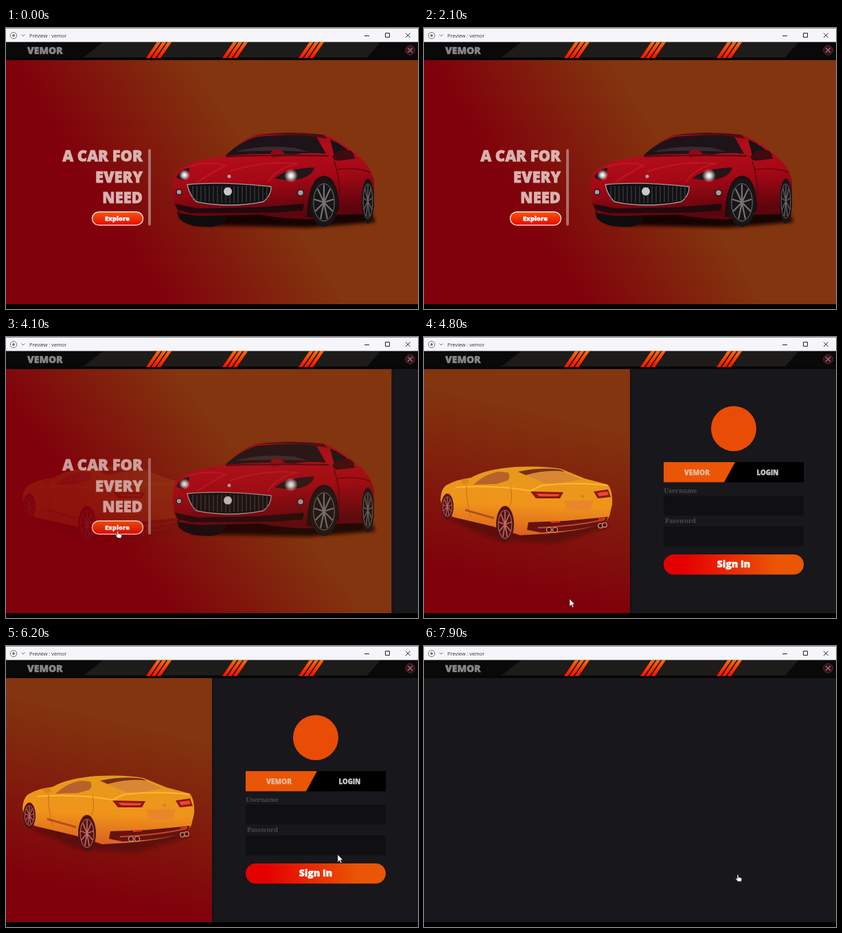
These frames come from a looping animation (600 px wide and 411 px high, 8000 ms). An HTML page:

```html
<!DOCTYPE html>
<html lang="en">
<head>
<meta charset="utf-8">
<title>Preview</title>
<style>
html, body { margin: 0; width: 100%; height: 100%; overflow: hidden; background: #18171c; }
svg { display: block; width: 600px; height: 411px; }
text { font-family: "Open Sans", "Noto Sans", sans-serif; }
.heavy { font-weight: 800; paint-order: stroke; stroke-width: .035em; }
.label { font: 700 9.3px "Noto Serif", serif; fill: #4b494d; }
.mid { text-anchor: middle; }
.end { text-anchor: end; }
</style>
</head>
<body>
<svg viewBox="0 0 600 411">
  <defs>
    <linearGradient id="back" gradientUnits="userSpaceOnUse">
      <stop offset="0" stop-color="#80000b"/><stop offset="1" stop-color="#82350e"/>
    </linearGradient>
    <linearGradient id="hot" x2="0" y2="1">
      <stop offset="0" stop-color="#ff6d06"/><stop offset="1" stop-color="#ff0c00"/>
    </linearGradient>
    <linearGradient id="pill" x2="0" y2="1">
      <stop offset="0" stop-color="#f9560a"/><stop offset="1" stop-color="#e60a02"/>
    </linearGradient>
    <linearGradient id="sign">
      <stop offset=".15" stop-color="#e50000"/><stop offset=".8" stop-color="#ea5506"/>
    </linearGradient>
    <linearGradient id="redPaint" x2=".2" y2="1">
      <stop offset="0" stop-color="#8d0a15"/><stop offset=".3" stop-color="#b30d1b"/><stop offset=".6" stop-color="#a60815"/><stop offset="1" stop-color="#5c050d"/>
    </linearGradient>
    <linearGradient id="goldPaint" x2="-.1" y2="1">
      <stop offset="0" stop-color="#e69a1c"/><stop offset=".5" stop-color="#f0941a"/><stop offset="1" stop-color="#d75a20"/>
    </linearGradient>
    <radialGradient id="glow">
      <stop offset="0" stop-color="#fff"/><stop offset=".3" stop-color="#fff" stop-opacity=".85"/><stop offset="1" stop-color="#fff" stop-opacity="0"/>
    </radialGradient>
    <filter id="soft" x="-20%" y="-100%" width="140%" height="300%"><feGaussianBlur stdDeviation="2.500"/></filter>
    <clipPath id="window"><rect y="46" width="600" height="358"/></clipPath>
  </defs>

  <rect width="600" height="411" fill="#18171c"/>

  <g id="login">
    <circle cx="451" cy="134" r="33" fill="#e94c05"/>
    <rect x="349" y="183" width="204" height="29.500"/>
    <path d="M349 183H453L437 212.500H349Z" fill="#ea5506"/>
    <text class="heavy mid" x="397.500" y="201.500" font-size="10" fill="#e9b69b" stroke="#e9b69b">VEMOR</text>
    <text class="heavy mid" x="500.500" y="201.500" font-size="9.700" fill="#c8c8c8" stroke="#c8c8c8">LOGIN</text>
    <text class="label" x="349.500" y="228">Username</text>
    <text class="label" x="351" y="272">Password</text>
    <path d="M349 232h204v29h-204zM349 277h204v29h-204z" fill="#100f12"/>
    <rect x="349" y="318" width="204" height="29.500" rx="14.750" fill="url(#sign)"/>
    <text class="heavy mid" x="451" y="337" font-size="14" fill="#fff" stroke="#fff">Sign In</text>
  </g>

  <g clip-path="url(#window)">
    <rect id="edge" y="46" height="358" fill="#000" opacity=".5" filter="url(#soft)"/>
    <rect id="panel" y="46" height="358" fill="url(#back)"/>

    <g id="goldCar">
      <path d="M35 266L105 297 190 302 270 278 250 270 130 262Z" fill="#42090a" opacity=".55" filter="url(#soft)"/>
      <path d="M24 238Q25 222 32 217 48 208 68 206 90 193 133 190 175 188 200 193L234 207 268 216Q275 225 274 245L270 262 264 272Q230 284 174 288L140 290 100 277 45 264 28 258Z" fill="url(#goldPaint)"/>
      <path d="M72 216Q88 201 108 197L122 198Q127 203 122 210L105 215Z" fill="#b7622c"/>
      <path d="M138 197Q170 191 198 195L228 208Q200 215 175 214Z" fill="#d98732"/>
      <path d="M137 197Q170 190 199 194L205 197Q180 193 148 202Z" fill="#763117"/>
      <path d="M46 220Q105 216 155 225L172 217Q220 212 267 217" fill="none" stroke="#ffb733" stroke-width="2"/>
      <path d="M62 217Q61 240 68 263M126 219Q130 240 124 248" fill="none" stroke="#ba641c" stroke-width=".8"/>
      <path d="M60 253L102 265" stroke="#b74f1c" stroke-width="3"/>
      <path d="M155 226L203 227 198 236 163 236ZM247 226L268 223 272 234 253 236Z" fill="#8b1712"/>
      <path d="M163 229L198 230 195 233 168 233ZM252 228L267 226 269 231 255 233Z" fill="#f0462e"/>
      <path d="M204 239H247L242 254H209Z" fill="#e9862a"/>
      <circle cx="231" cy="233" r="2.500" fill="#c28a33"/>
      <path d="M152 271L205 269 268 263 264 273Q225 284 170 286L150 282Z" fill="#651312"/>
      <path d="M166 279Q220 277 263 267" fill="none" stroke="#c24a26" stroke-width="2"/>
      <path d="M185 271L198 270M254 266L264 265" stroke="#f03220" stroke-width="2"/>
      <g fill="#4b1010" stroke="#ce8d76" stroke-width="1.300">
        <circle cx="182" cy="282" r="3.600"/><circle cx="191" cy="282" r="3.600"/>
        <circle cx="257" cy="276" r="3.300"/><circle cx="263" cy="275" r="3.300"/>
      </g>
      <path d="M53 210l10-3 3 6-8 3z" fill="#df8419"/>
      <g class="wheel" data-at="34 248 9 19 #b3615c #531313"></g>
      <g class="wheel" data-at="118 274 13 27 #c06d69 #531313"></g>
    </g>

    <g id="home">
      <path d="M250 274L272 288 440 292 538 284 530 266 300 264Z" fill="#0d0303" opacity=".92" filter="url(#soft)"/>
      <path d="M249 268L320 272Q322 288 300 291 262 292 252 278Z" fill="#100c0d"/>
      <path d="M243 240Q242 222 248 210 262 197 294 191L321 187Q340 165 362 157 410 150 462 156 486 163 512 187 530 200 536 223L536 262 524 272 484 273 440 280Q400 279 370 273L280 275 252 271 245 259Z" fill="url(#redPaint)"/>
      <path d="M319 187Q342 165 367 159 420 154 452 159L466 184Q440 181 420 185 370 182 319 187Z" fill="#1c1418"/>
      <path d="M362 157Q410 150 462 156L468 162Q420 153 362 157Z" fill="#4d0c13"/>
      <path d="M334 181Q370 170 420 175L440 181Q390 178 334 181Z" fill="#392a2f"/>
      <path d="M472 163Q495 172 509 191L480 194Z" fill="#171416"/>
      <path d="M475 188q8-12 26-9 7 4 6 11-14 5-29 3z" fill="#3f0a10"/>
      <path d="M387 190q-5-11 6-13 12 1 13 10z" fill="#8f0b15"/>
      <path d="M262 205Q290 193 320 201 300 211 278 226M326 210Q370 194 425 198 394 205 381 226" fill="none" stroke="#d0202c" stroke-width="2" opacity=".55"/>
      <path d="M321 188Q380 185 470 187" fill="none" stroke="#54070f" stroke-width="2"/>
      <path d="M478 195Q490 230 483 268M482 207Q510 203 531 211M486 262L514 260" fill="none" stroke="#5f060e" stroke-width="1.500"/>
      <path d="M248 219Q252 208 267 204 267 216 258 223ZM391 220Q408 205 449 204 447 214 434 219 416 225 391 220Z" fill="#241519"/>
      <circle cx="260" cy="215" r="8" fill="url(#glow)"/>
      <circle cx="415" cy="216" r="10" fill="url(#glow)"/>
      <path d="M264 229Q315 224 386 232 387 244 375 254 325 264 277 254 267 244 264 229Z" fill="#111012" stroke="#a29b9d" stroke-width="1.300"/>
      <path id="slats" stroke="#49474b" stroke-width="1"/>
      <circle cx="323" cy="239" r="6" fill="#c9c7ca"/>
      <circle cx="325" cy="217" r="2.500" fill="#b9a5a7"/>
      <path d="M246 257L280 264 370 262 434 257 432 267 390 270 270 271 250 266Z" fill="#20090d"/>
      <g fill="#a39da0" stroke="#24171a" stroke-width="1.500"><circle cx="252" cy="240" r="4"/><circle cx="429" cy="241" r="4.500"/></g>
      <path d="M438 276Q440 217 464 216 484 219 485 265L475 280Z" fill="#200b0e"/>
      <g class="wheel" data-at="463 255 20 36 #777276 #171516"></g>
      <g class="wheel" data-at="527 253 9 33 #676366 #171516"></g>

      <g class="heavy end" font-size="22" fill="#d8b3b0" stroke="#d8b3b0">
        <text x="199" y="195">A CAR FOR</text>
        <text x="199" y="226">EVERY</text>
        <text x="199" y="256">NEED</text>
      </g>
      <rect x="207" y="177" width="4" height="112" rx="2" fill="#ab716b"/>
      <rect x="125.500" y="269" width="74" height="19.300" rx="9.650" fill="url(#pill)" stroke="#fbe4dc" stroke-width="1.300"/>
      <text class="heavy mid" x="162" y="282" font-size="9.400" fill="#fff" stroke="#fff">Explore</text>
    </g>
  </g>

  <rect y="404" width="600" height="7"/>
  <rect y="20" width="600" height="27" fill="#090909"/>
  <path d="M141 21H545L526 43H113Z" fill="#1d1c1b"/>
  <path d="M0 45H600" stroke="#070707" stroke-width="4"/>
  <text class="heavy" x="31" y="38" font-size="14" fill="#888" stroke="#888">VEMOR</text>
  <path id="stripes" fill="url(#hot)"/>
  <circle cx="588.500" cy="32.500" r="6.800" fill="#39101a" stroke="#682329"/>
  <path d="M585 29l7 7m0-7l-7 7" stroke="#857073" stroke-width="1.600"/>

  <rect width="600" height="20.500" fill="#f6f5fa"/>
  <rect width="600" height="1" fill="#98979a"/>
  <g fill="none" stroke="#777" stroke-width="1">
    <circle cx="11" cy="11" r="4.700"/><circle cx="11" cy="11" r="1.900" fill="#777" stroke="none"/>
    <path d="M22.500 9.500l2.500 2.500 2.500-2.500"/>
    <path d="M522 11.500h7M552.500 7.500h6v6h-6zM582 7.500l6.500 6.500m0-6.500l-6.500 6.500" stroke="#222"/>
  </g>
  <text x="34" y="14" font-size="7.350" fill="#333">Preview : vemor</text>

  <g id="cursor" stroke="#222" stroke-width=".6" stroke-linejoin="round">
    <path id="arrow" d="M0 0V11L2.500 8.700 4.300 12.500 6 11.700 4.300 8H7.500Z" fill="#fff"/>
    <path id="hand" d="M-.9.900Q0-.6.900.900V4.200L5 5.300Q6 5.700 5.800 7L5 10.500H0L-3 6.700Q-3.200 5.300-1.900 5.700L-.9 6.700Z" fill="#fff"/>
  </g>
</svg>
<script>
const $ = id => document.getElementById(id);
const set = (id, attrs) => Object.entries(attrs).forEach(([k, v]) => $(id).setAttribute(k, v));
const mix = (a, b, p) => a + (b - a) * p;
const ease = (t, from, to) => {
  const p = Math.min(1, Math.max(0, (t - from) / (to - from)));
  return p * p * (3 - 2 * p);
};

let stripes = "", slats = "";
for (const x of [204, 315, 426])
  for (let i = 0; i < 3; i++) stripes += `M${x + i * 7.8} 44l16-23.5h5.6l-16 23.5z`;
for (let x = 272; x < 383; x += 6) slats += `M${x} 231V${257 - Math.abs(x - 325) / 12}`;
set("stripes", { d: stripes });
set("slats", { d: slats });

for (const wheel of document.querySelectorAll(".wheel")) {
  const [x, y, rx, ry, rim, tyre] = wheel.dataset.at.split(" ");
  let spokes = "";
  for (let i = 0; i < 9; i++) {
    const a = i * Math.PI * 2 / 9;
    spokes += `M${x} ${y}L${+x + rx * .72 * Math.sin(a)} ${+y - ry * .72 * Math.cos(a)}`;
  }
  wheel.innerHTML = `<ellipse cx="${x}" cy="${y}" rx="${rx}" ry="${ry}" fill="${tyre}"/>
    <ellipse cx="${x}" cy="${y}" rx="${rx * .76}" ry="${ry * .76}" fill="none" stroke="${rim}"/>
    <path d="${spokes}" stroke="${rim}" stroke-width="${rx / 12 + .5}"/>`;
}

// Pointer path: time, x, y of the tip
const path = [
  [2250, 205, 414], [2800, 195, 322], [3500, 162, 282], [4050, 162, 282],
  [4750, 212, 383], [4950, 212, 383], [6100, 483, 305], [6300, 483, 305],
  [6850, 457, 333], [8000, 457, 334]
];

function pointer(t) {
  const i = Math.max(1, path.findIndex(k => k[0] > t));
  const [a, b] = [path[i - 1], path[i]], p = ease(t, a[0], b[0]);
  return [mix(a[1], b[1], p), mix(a[2], b[2], p)];
}

function draw(t) {
  const open = ease(t, 4000, 4450), leave = ease(t, 7350, 7800);
  const width = 600 - 300 * (open + leave);
  set("panel", { width });
  set("edge", { width, visibility: width < 1 ? "hidden" : "visible" });
  set("back", { x1: mix(110, 90, open), y1: mix(220, 360, open), x2: mix(304, 150, open), y2: mix(98, 105, open) });
  set("home", { opacity: 1 - open });
  set("goldCar", { opacity: open, transform: `translate(${-300 * leave})` });
  set("login", { opacity: open * (1 - leave) });

  const [x, y] = pointer(t);
  const onLink = t > 3250 && t < 4250 || t > 6650;
  set("cursor", { transform: `translate(${x} ${y})`, visibility: t < 2250 ? "hidden" : "visible" });
  set("arrow", { display: onLink ? "none" : "inline" });
  set("hand", { display: onLink ? "inline" : "none" });
}

const start = performance.now();
function frame() {
  draw((performance.now() - start) % 8000);
  requestAnimationFrame(frame);
}
frame();
</script>
</body>
</html>
```
